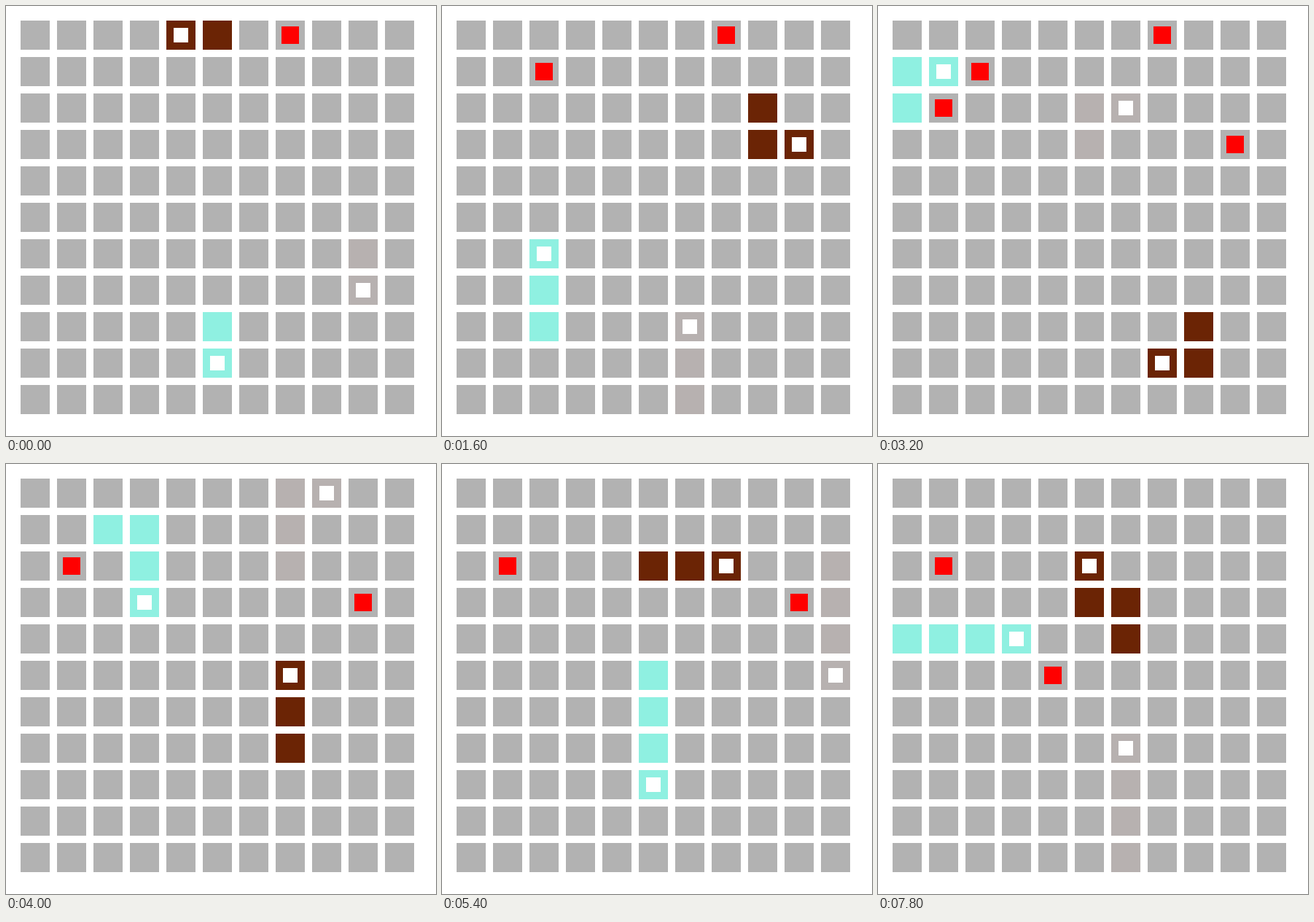
Animation of 590 by 590 pixels, one loop 8 s. Source, as an HTML page with a canvas:

```html
<!DOCTYPE html>
<html lang="en">
<head>
<meta charset="utf-8">
<title>Three snakes on a grid</title>
<style>
  html, body { margin: 0; width: 100%; height: 100%; overflow: hidden; background: #fff; }
  canvas { display: block; }
</style>
</head>
<body>
<canvas id="stage" width="590" height="590"></canvas>
<script>
const STEP_MS = 200, STEPS = 40, GRID = 11, PITCH = 50, MARGIN = 20, CELL = 40;
const MOVES = { L: [-1, 0], R: [1, 0], U: [0, -1], D: [0, 1] };

// Each route starts one move before the loop does; meal is the step of the eaten food.
const snakes = [
  { color: '#6b2405', start: [5, 0], meal: 32,
    route: 'L D R4 D2 R D3 L D3 L U6 L2 U R2 U R2 D2 L2 D L U L U' },
  { color: '#8ff0e1', start: [5, 8], meal: 17,
    route: 'D2 L3 U5 L2 U4 R3 D4 R2 D3 L3 U L2 U3 R3' },
  { color: '#b7b1b0', start: [9, 6], meal: 19,
    route: 'D4 L3 U4 L U4 R2 U2 R D2 R2 D6 L2 D2 L2 U3' }
];

const foods = [
  { cell: [7, 0], from: 0, until: 19 },
  { cell: [2, 1], from: 4, until: 17 },
  { cell: [1, 2], from: 12, until: STEPS },
  { cell: [9, 3], from: 14, until: 32 },
  { cell: [4, 5], from: 37, until: STEPS }
];

function walk(start, route) {
  const path = [start];
  for (const leg of route.split(' ')) {
    const [dx, dy] = MOVES[leg[0]];
    for (let n = +leg.slice(1) || 1; n > 0; n--) {
      const [x, y] = path[path.length - 1];
      path.push([x + dx, y + dy]);
    }
  }
  return path;
}

for (const snake of snakes) snake.path = walk(snake.start, snake.route);

const ctx = document.getElementById('stage').getContext('2d');

function square([col, row], size, color) {
  const inset = MARGIN + (CELL - size) / 2;
  ctx.fillStyle = color;
  ctx.fillRect(col * PITCH + inset, row * PITCH + inset, size, size);
}

function draw(step) {
  ctx.fillStyle = '#fff';
  ctx.fillRect(0, 0, 590, 590);
  for (let i = 0; i < GRID * GRID; i++) {
    square([i % GRID, Math.floor(i / GRID)], CELL, '#b2b2b2');
  }
  for (const { cell, from, until } of foods) {
    if (step >= from && step < until) square(cell, 24, '#f00');
  }
  for (const { color, path, meal } of snakes) {
    const length = Math.min(3, step + 2) + (step >= meal ? 1 : 0);
    const body = path.slice(step + 2 - length, step + 2);
    for (const cell of body) square(cell, CELL, color);
    square(body[length - 1], 20, '#fff');
  }
}

let origin = null, shown = 0;
draw(0);

function tick(now) {
  if (origin === null) origin = now;
  const step = Math.floor(Math.max(0, now - origin) / STEP_MS) % STEPS;
  if (step !== shown) draw(shown = step);
  requestAnimationFrame(tick);
}
requestAnimationFrame(tick);
</script>
</body>
</html>
```
